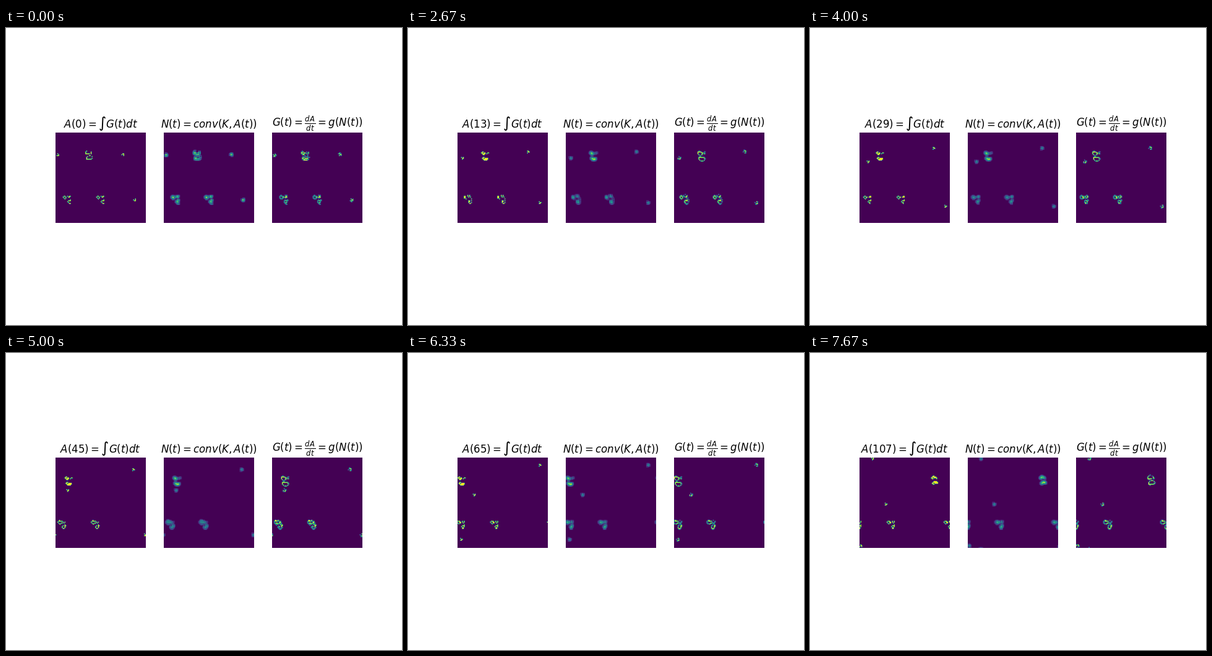
These frames come from a looping animation (640x480 px, 8000 ms). A matplotlib script:

```python
import numpy as np
import matplotlib.pyplot as plt
from matplotlib.animation import FuncAnimation

SIZE = 100
FRAMES = 24
LOOP_MS = 8000

GLIDER = ".O. ..O OOO"
SIDECAR = (".O...... O.....O. O.....O. OOOOO.O. ........ "
           "....OO.. ..O....O .O...... .O.....O .OOOOOO.")
LOAFER = (".OO..O.OO O..O..OO. .O.O..... ..O...... ........O "
          "......OOO .....O... ......O.. .......OO")


def cells(text):
    return np.array([[c == "O" for c in row] for row in text.split()], float)


def place(world, pattern, row, col):
    h, w = pattern.shape
    world[row:row + h, col:col + w] = pattern


def neighbours(world):
    return sum(np.roll(world, (dy, dx), (0, 1))
               for dy in (-1, 0, 1) for dx in (-1, 0, 1) if dy or dx)


def growth(count):
    return (count == 3) * 1.0 - ((count < 2) | (count > 3))


def generation(frame):
    """Playback accelerates: the generation grows with the square of time."""
    return int(0.2035 * frame ** 2)


glider = cells(GLIDER)
world = np.zeros((SIZE, SIZE))
place(world, cells(SIDECAR), 20, 33)
place(world, cells(LOAFER), 70, 8)
place(world, cells(LOAFER), 70, 45)
place(world, glider, 23, 1)
place(world, glider.T[::-1], 23, 73)
place(world, glider.T, 73, 86)

history = [world]
for _ in range(generation(FRAMES - 1)):
    last = history[-1]
    history.append(np.clip(last + growth(neighbours(last)), 0, 1))

fig, axes = plt.subplots(1, 3, figsize=(6.4, 4.8), dpi=100)
images = []
for ax in axes:
    images.append(ax.imshow(world, cmap="viridis"))
    ax.axis("off")
axes[1].set_title(r"$N(t)=conv(K,A(t))$")
axes[2].set_title(r"$G(t)=\frac{dA}{dt}=g(N(t))$")


def update(frame):
    t = generation(frame)
    state = history[t]
    count = neighbours(state)
    for image, data in zip(images, (state, count, growth(count))):
        image.set_data(data)
        image.autoscale()
    axes[0].set_title(rf"$A({t})=\int G(t)dt$")
    return images


anim = FuncAnimation(fig, update, frames=FRAMES, interval=LOOP_MS / FRAMES,
                     repeat=True, repeat_delay=0, blit=False)
plt.show()
```
